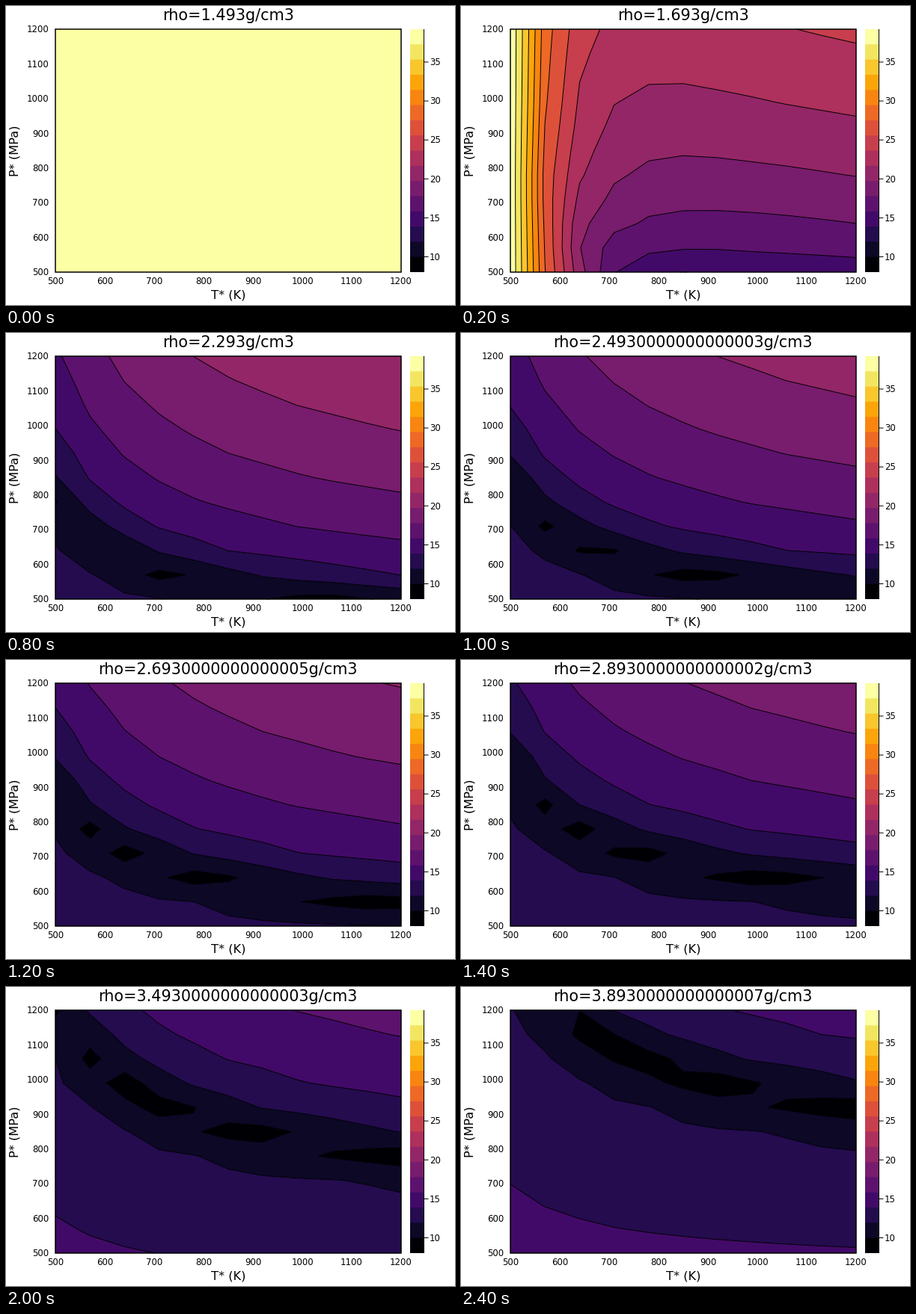
A matplotlib script for the animation above (2600 ms loop, 600 by 400 pixels).

```python
import numpy as np
import matplotlib.pyplot as plt
from matplotlib.animation import FuncAnimation
from matplotlib.patches import Rectangle

plt.rcParams["font.family"] = "DejaVu Sans"

W, H = 600, 400
LEFT, RIGHT, TOP, BOTTOM = 66, 528, 31, 356
FRAMES, INTERVAL = 13, 200
BANDS, TOP_LEVEL = 16, 10
Z_MIN, PX_PER_Z = 8.03, 10.42
AXIS = np.linspace(500, 1200, 11)
COLORS = [plt.get_cmap("inferno")(k / (BANDS - 1)) for k in range(BANDS)]


def pressure(T, step, start, rate, slope, bend, delay):
    """Pressure where an error level is reached; it grows with density and 1/T."""
    x = 1000 / T - 1000 / AXIS[-1]
    onset = np.exp(-2 * step)
    return np.exp(start + rate * step + 0.02 * onset
                  + slope * x + (bend + delay * onset) * x**3)


def upper(T, step, level):
    m = level - 2
    start = 6.097 + 0.206 * m - 0.23 * (1 - np.exp(-m / 1.2))
    return pressure(T, step, start, 0.161 + 0.007 * m, 0.298 + 0.027 * m,
                    0.07 + 0.015 * m, 0.15 + 0.045 * m)


def column(T, step):
    """Error over pressure: a sharp valley with two flattening flanks."""
    low3 = pressure(T, step, 5.532, 0.143, 0.16, 0.07, 0.15)
    low2 = pressure(T, step, 5.895, 0.163, 0.265, 0.07, 0.15)
    levels = range(2, TOP_LEVEL + 1)
    high = [upper(T, step, n) for n in levels]
    valley = low2 + 0.56 * (high[0] - low2)
    floor = 0.45 + 0.25 * max(0, 1 - (T - 500) / 140) + min(1, np.exp(-2 * step))
    return np.interp(AXIS, [0.4 * low3, low3, low2, valley, *high],
                     [4, 3, 2, floor, *levels])


def field(i):
    """Error on the (P, T) grid, in units of colour bands."""
    u = np.array([column(T, i / 2 - 1) for T in AXIS]).T
    # At low density the model fails: everywhere first, then only at low T.
    failing = np.ones(AXIS.size) if i == 0 else np.exp(-(AXIS - 500) / 120) * (i == 1)
    u += (BANDS - 0.1 - u) * failing
    return np.clip(u, 0.01, BANDS - 0.01)


fig = plt.figure(figsize=(W / 100, H / 100), dpi=100, facecolor="white")
ax = fig.add_axes([0, 0, 1, 1])


def px(size):
    return size * 0.72


def label(x, y, text, size, ha="center", **kw):
    return ax.text(x, y, text, fontsize=px(size), ha=ha, va="baseline", **kw)


def line(xs, ys):
    ax.plot(xs, ys, color="black", lw=px(1), solid_capstyle="butt", snap=False)


grid_x = np.linspace(LEFT, RIGHT, AXIS.size)
grid_y = np.linspace(BOTTOM, TOP, AXIS.size)

ax.add_patch(Rectangle((LEFT, TOP), RIGHT - LEFT, BOTTOM - TOP, fill=False,
                       ec="black", lw=px(1.5), snap=False, zorder=5))
for v in range(500, 1201, 100):
    f = (v - 500) / 700
    label(LEFT + f * (RIGHT - LEFT), 372, v, 11.8)
    label(57.5, BOTTOM - f * (BOTTOM - TOP) + 4.3, v, 11.8, ha="right")
label(297.5, 392, "T* (K)", 16.2)
label(16.5, 193.5, "P* (MPa)", 16.2, rotation=90, rotation_mode="anchor")
title = label(296.8, 18.6, "", 20.75)

band = (BOTTOM - TOP) / BANDS
for k, color in enumerate(COLORS):
    ax.add_patch(Rectangle((540, TOP), 18.5, BOTTOM - TOP - k * band,
                           fc=color, lw=0, snap=False))
line([558.5, 558.5], [TOP, BOTTOM])
for v in range(10, 36, 5):
    y = BOTTOM - (v - Z_MIN) * PX_PER_Z
    line([558.5, 564.5], [y, y])
    label(566, y + 4.3, v, 11.8, ha="left")

contours = []


def update(i):
    while contours:
        contours.pop().remove()
    u = field(i)
    contours.append(ax.contourf(grid_x, grid_y, u, levels=range(BANDS + 1),
                                colors=COLORS, zorder=1))
    if np.ptp(u) > 0:
        contours.append(ax.contour(grid_x, grid_y, u, levels=range(1, BANDS),
                                   colors="black", linewidths=px(1), zorder=2))
    title.set_text(f"rho={1.493 + 0.2 * i}g/cm3")
    ax.set_xlim(0, W)
    ax.set_ylim(H, 0)
    ax.axis("off")
    return [title]


anim = FuncAnimation(fig, update, frames=FRAMES, interval=INTERVAL,
                     init_func=lambda: [], repeat=True, repeat_delay=0, blit=False)
plt.show()
```
